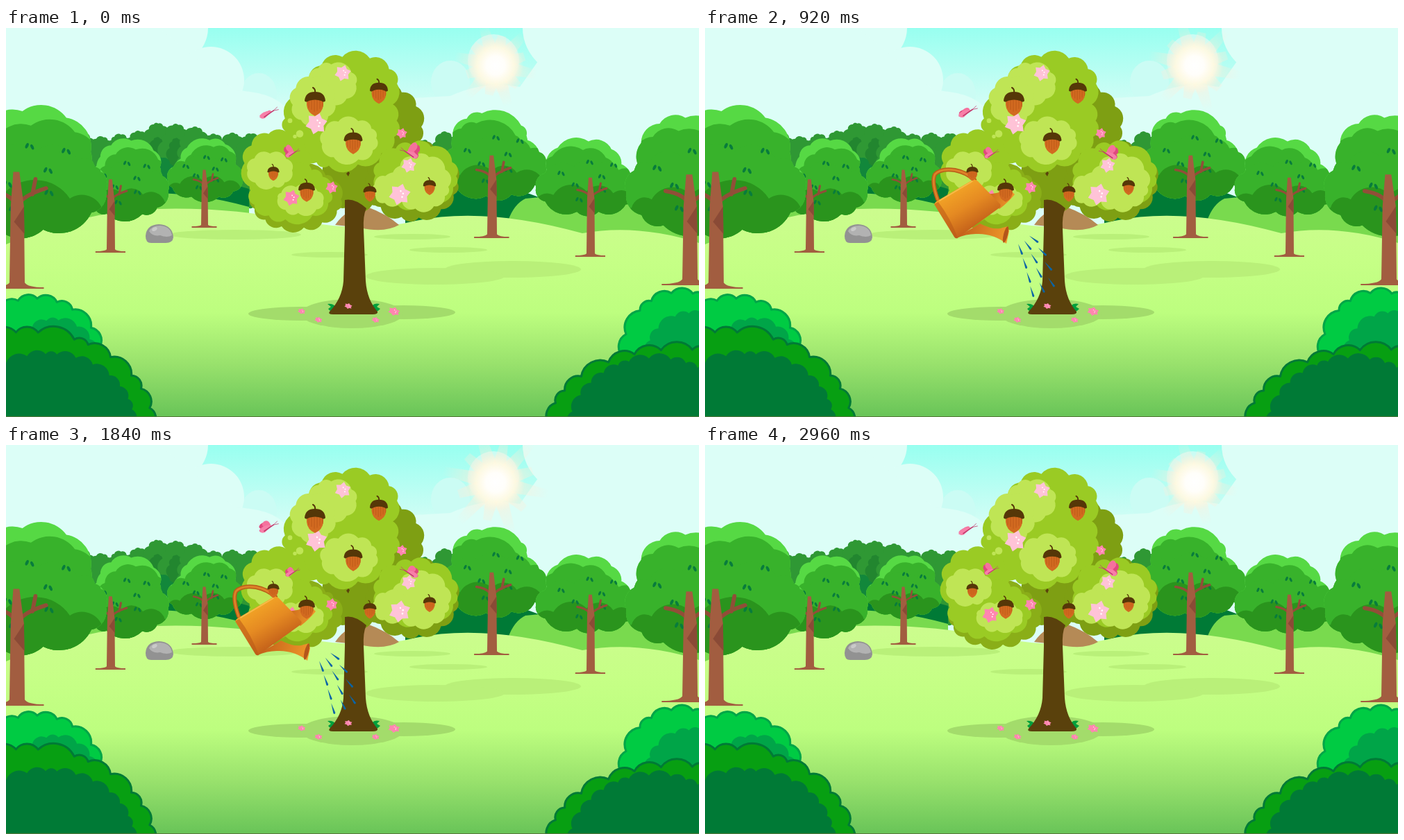
An HTML page with a canvas for the animation above (3000 ms loop, 998x561 px).

```html
<!DOCTYPE html>
<html lang="en">
<head>
<meta charset="utf-8">
<title>Watering the oak</title>
<style>
html, body { margin: 0; width: 998px; height: 561px; overflow: hidden; background: #dcfef6; }
canvas { display: block; }
</style>
</head>
<body>
<canvas id="stage" width="998" height="561"></canvas>
<script>
const W = 998, H = 561, LOOP = 3000, BEAT = 1000, TAU = 2 * Math.PI;
const view = document.getElementById('stage').getContext('2d');
const landCanvas = Object.assign(document.createElement('canvas'), { width: W, height: H });
let c = landCanvas.getContext('2d');

let seed = 7;
const random = () => (seed = seed * 16807 % 2147483647) / 2147483647;
const ramp = (t, a, b) => Math.min(1, Math.max(0, (t - a) / (b - a)));

function fill(color, d) {
  c.fillStyle = color;
  c.fill(d instanceof Path2D ? d : new Path2D(d));
}
function line(color, width, d) {
  c.strokeStyle = color;
  c.lineWidth = width;
  c.lineCap = c.lineJoin = 'round';
  c.stroke(d instanceof Path2D ? d : new Path2D(d));
}
function oval(color, x, y, rx, ry = rx, turn = 0) {
  c.fillStyle = color;
  c.beginPath();
  c.ellipse(x, y, rx, ry, turn, 0, TAU);
  c.fill();
}
function at(x, y, turn, sx, sy, draw) {
  c.save();
  c.translate(x, y);
  c.rotate(turn);
  c.scale(sx, sy);
  draw();
  c.restore();
}
function stops(g, colors) {
  colors.forEach((color, i) => g.addColorStop(i / (colors.length - 1), color));
  return g;
}
const linear = (x0, y0, x1, y1, ...colors) => stops(c.createLinearGradient(x0, y0, x1, y1), colors);
const radial = (r, ...colors) => stops(c.createRadialGradient(0, 0, 0, 0, 0, r), colors);

// Ellipse whose rim is broken into bulging, slightly uneven leaf clumps.
function leafy(x, y, rx, ry, bump, round = 0.62) {
  const n = Math.round(Math.PI * (rx + ry) / bump), inset = bump * 0.13, points = [];
  for (let i = 0; i < n; i++) {
    const a = (i + (random() - 0.5) * 0.55) / n * TAU;
    points.push([x + (rx - inset) * Math.cos(a), y + (ry - inset) * Math.sin(a)]);
  }
  let d = 'M' + points[0];
  points.forEach((p, i) => {
    const q = points[(i + 1) % n], r = Math.hypot(p[0] - q[0], p[1] - q[1]) * round;
    d += `A${r} ${r} 0 0 1 ${q}`;
  });
  return new Path2D(d + 'Z');
}
function join(...paths) {
  const all = new Path2D();
  paths.forEach(p => all.addPath(p));
  return all;
}

/* ---------- sky ---------- */
function sky() {
  const cloud = '#dcfef7', haze = '#cbfcf4';
  c.fillStyle = linear(0, 0, 0, 110, '#98fff0', '#d2fdf5');
  c.fillRect(0, 0, W, H);
  oval(haze, 364, 95, 26, 30);
  oval(haze, 640, 78, 28, 31);
  oval(haze, 702, 47, 37, 38);
  oval(cloud, 220, 0, 71, 60);
  oval(cloud, 295, 75, 48);
  oval(cloud, 830, 0, 86, 75);
  fill(cloud, 'M0 0H220L330 90Q380 92 400 112L640 98Q690 75 740 85L800 0H998V330H0Z');
}
function sun(beat) {
  const reach = 58 + 42 * beat, size = 40 + 5 * beat;
  at(705, 54, 0.22, 1, 1, () => {
    c.fillStyle = radial(reach, 'rgba(255,246,224,.9)', 'rgba(255,238,214,.45)', 'rgba(255,232,215,0)');
    for (let i = 0; i < 12; i++) {
      const len = reach * (i % 2 ? 0.72 : 1);
      c.fill(new Path2D(`M8-11L${len}-6V6L8 11Z`));
      c.rotate(TAU / 12);
    }
    oval(radial(size, '#fff', '#fffefa', 'rgba(255,250,226,.85)', 'rgba(255,242,220,0)'), 0, 0, size);
  });
}

/* ---------- land ---------- */
function forest() {
  for (let x = 110; x < 370; x += 27) {
    const top = 150 - 18 * Math.exp(-(((x - 240) / 50) ** 2)) + 8 * random();
    fill('#2f9834', leafy(x, top + 55, 25, 55, 15));
    if (x > 190 && x < 300) fill('#22862f', leafy(x, top + 65, 14, 45, 12));
  }
  fill('#2f9834', leafy(602, 210, 20, 50, 15));
  fill('#2f9834', leafy(632, 205, 22, 57, 15));
  fill('#12873b', leafy(222, 225, 24, 40, 16));
  fill('#007a36', 'M210 270V225Q260 205 350 232V270ZM575 285V214Q640 195 770 245V285Z');
  fill('#79da4e', 'M0 340V238H180Q270 235 350 258V340ZM715 340Q715 262 748 246L830 238H998V340Z');
}
function field() {
  fill(linear(0, 260, 0, H, '#ccfc8e', '#c6ff86', '#bdfe7f', '#98e16c', '#68c458'),
    'M0 312Q110 264 218 261Q320 258 420 278Q520 296 590 278Q690 257 830 296Q910 282 998 310V561H0Z');
  fill('#b58a56', 'M474 284Q492 258 520 258Q548 268 566 284Q545 296 510 288Z');
  const dim = '#b9f079';
  oval(dim, 330, 298, 95, 7);
  oval(dim, 585, 301, 55, 4);
  oval(dim, 466, 327, 55, 4);
  oval(dim, 637, 320, 56, 4);
  oval(dim, 730, 348, 98, 12);
  oval(dim, 618, 358, 100, 12);
  oval('#a3dc6b', 425, 412, 76, 10);
  oval('#a3dc6b', 572, 410, 75, 10);
  oval('#a3dc6b', 498, 412, 74, 21);
  fill('#929292', 'M201 300Q202 284 220 283Q240 284 241 302Q240 310 230 310H209Q201 310 201 300Z');
  fill('#b2b2b2', 'M206 293Q210 285 222 285Q237 286 239 299Q232 303 222 299Q211 301 206 293Z');
  oval('#c9c9c9', 214, 290, 4, 2.5, -0.5);
}
function trunk(x, top, fork, foot, w) {
  at(x, 0, 0, 1, 1, () => {
    line('#914e38', w * 0.26, `M0 ${fork}Q${-w * 0.3} ${fork - w * 0.8} ${-w * 1.6} ${fork - w}M0 ${fork}Q${w * 0.3} ${fork - w * 0.7} ${w * 1.9} ${fork - w * 1.2}M${w} ${fork - w * 0.8}l${w * 0.2} ${-w}`);
    fill('#a25d40', `M${-w * 0.25} ${top}H${w * 0.15}L${w * 0.45} ${fork}L${w / 2} ${foot - w * 0.4}Q${w * 0.7} ${foot - 2} ${w * 1.75} ${foot - 2}V${foot}H${-w * 1.85}V${foot - 2}Q${-w * 0.7} ${foot - 2} ${-w / 2} ${foot - w * 0.4}L${-w * 0.42} ${fork}Z`);
    fill('#8a4a36', `M${w * 0.45} ${fork}L${-w * 0.2} ${fork + w}L${w * 0.48} ${fork + w * 1.8}Z`);
  });
}
function tree(x, crownX, top, bottom, rx, foot, w) {
  const ry = (bottom - top) / 2, y = top + ry, lean = crownX < W / 2 ? 1 : -1;
  const crown = join(
    leafy(crownX + 0.08 * lean * rx, y - ry * 0.3, rx * 0.74, ry * 0.7, rx * 0.5, 0.7),
    leafy(crownX, y + ry * 0.27, rx, ry * 0.73, rx * 0.5, 0.7));
  fill('#56d944', crown);
  c.save();
  c.clip(crown);
  at(0.1 * rx * lean, ry * 0.22, 0, 1, 1, () => fill('#38b22b', crown));
  fill('#38b22b', leafy(crownX, y + ry * 0.4, rx * 1.1, ry * 0.75, rx * 0.4));
  fill('#2a941d', leafy(crownX, y + ry * 0.8, rx * 1.05, ry * 0.5, rx * 0.4));
  c.restore();
  for (let i = 0; i < 7; i++) {
    const a = i * 2.4, r = 0.25 + 0.06 * i, s = 0.5 + w / 50;
    for (const side of [-1, 1])
      oval('#087c3c', crownX + r * rx * Math.cos(a) + side * 4 * s, y + r * ry * Math.sin(a) + side * s, 2.2 * s, 4.4 * s, -side * 0.45);
  }
  trunk(x, y + ry * 0.02, y + ry * 0.55, foot, w);
}
function bush(body, edge, ...shape) {
  const p = leafy(...shape);
  fill(body, p);
  if (edge) line(edge, 3, p);
}
function bushes() {
  const lime = '#00cb43', moss = '#00a548', leaf = '#079f12', dark = '#007a36';
  bush(lime, moss, 42, 488, 102, 102, 32);
  bush(moss, '', 70, 490, 66, 72, 24);
  bush(leaf, dark, 28, 580, 188, 146, 34);
  bush(dark, '', 60, 575, 128, 108, 24);
  bush(lime, moss, 972, 472, 88, 95, 32);
  bush(moss, '', 990, 480, 72, 72, 24);
  bush(leaf, dark, 970, 580, 194, 121, 34);
  bush(dark, '', 935, 585, 128, 112, 24);
}
function oak() {
  const deep = '#7e9f13', mid = '#9acb24', pale = '#bfe555';
  const clump = (color, ...shape) => fill(color, leafy(...shape));
  clump(deep, 530, 140, 72, 62, 30);
  clump(deep, 505, 218, 52, 46, 30);
  clump(deep, 585, 220, 68, 58, 30);
  clump('#8aae18', 418, 245, 68, 47, 28);
  clump(mid, 500, 86, 68, 50, 34);
  clump(mid, 482, 138, 85, 66, 32);
  clump(mid, 390, 200, 51, 53, 32);
  clump(mid, 410, 238, 62, 42, 28);
  clump(mid, 590, 213, 62, 49, 30);
  clump(pale, 470, 80, 37, 31, 26);
  clump(pale, 442, 105, 33, 37, 26);
  clump(pale, 494, 162, 43, 33, 28);
  clump(pale, 380, 205, 35, 27, 24);
  clump(pale, 424, 248, 36, 22, 24);
  clump(pale, 598, 223, 43, 42, 28);
  clump(pale, 556, 233, 30, 24, 24);
  for (let i = 0; i < 6; i++) oval(pale, 409 + 7 * i, 130 + 40 * random(), 2.5 + 3 * random());
  fill('#009f3c', 'M478 411Q475 396 463 398L468 402L464 405Q467 410 478 411ZM522 411Q526 395 538 398L534 402L539 405Q534 411 522 411Z');
  fill('#5a410c', 'M488 248Q502 245 519 260Q514 270 515 290L518 365Q520 392 535 409Q536 413 528 413H471Q463 413 466 409Q484 390 486 365L488 290ZM490 210l3-3 2 2-2 5Z');
}
function paintLand() {
  forest();
  field();
  tree(286, 287, 158, 249, 58, 288, 10);
  tree(151, 172, 158, 276, 66, 324, 12);
  tree(16, 30, 111, 300, 122, 376, 22);
  tree(700, 703, 117, 248, 80, 303, 14);
  tree(842, 838, 158, 271, 80, 330, 12);
  tree(985, 985, 123, 296, 98, 371, 22);
  bushes();
  oak();
  c.fillStyle = '#57783a';
  c.fillRect(0, 560, W, 1);
}

/* ---------- moving parts ---------- */
function acorn(x, y, s) {
  at(x, y, 0, s, s, () => {
    fill('#d26a20', 'M-12-5V5Q-11 16 0 21Q11 16 12 5V-5Z');
    for (let i = -9; i < 12; i += 4) line('#b85717', 0.8, `M${i}-2V${15 - Math.abs(i) * 0.7}`);
    line('#553708', 2, 'M0-12Q1-18-3-20');
    fill('#553708', 'M-15-1Q-14-14 0-14Q14-14 15-1Q13 2 9-1Q0-4-9-1Q-13 2-15-1Z');
  });
}
function acorns() {
  acorn(445, 106, 1);
  acorn(537, 91, 0.87);
  acorn(500, 163, 0.9);
  acorn(385, 208, 0.58);
  acorn(433, 234, 0.8);
  acorn(524, 237, 0.64);
  acorn(610, 228, 0.62);
}
function blossom(x, y, r, petal, beat, squash = 1) {
  at(x, y, 0.3 - 0.32 * beat, r / 16, squash * r / 16, () => {
    for (let i = 0; i < 6; i++) {
      fill(petal, 'M0 0Q-8-6-5-10L0-16L5-10Q8-6 0 0Z');
      oval('#fff', 0, 5, 1.3);
      c.rotate(TAU / 6);
    }
  });
}
function blossoms(beat) {
  const light = '#ffc3d7', hot = '#ff86b0';
  blossom(447, 138, 16, light, beat);
  blossom(485, 65, 12, light, beat);
  blossom(580, 198, 11, light, beat);
  blossom(567, 240, 16, light, beat);
  blossom(411, 245, 12, hot, beat);
  blossom(469, 230, 9, hot, beat);
  blossom(570, 152, 8, hot, beat);
  for (let i = 0; i < 5; i++) {
    const a = i * TAU / 5 - 0.3;
    blossom(492 + 70 * Math.cos(a), 412 + 11 * Math.sin(a), i ? 6 : 9, hot, beat, 0.7);
  }
}
function butterfly(x, y, side, size, open) {
  at(x, y, 0, size * side, size, () => {
    c.rotate(-0.48);
    c.save();
    c.transform(1, 0, -0.15, 0.12 + 0.88 * open, 0, 0);
    fill('#e0487f', 'M3 1Q-2-21-12-18Q-17-13-13-7Q-18-3-13 3Z');
    fill('#f5719d', 'M3 0Q2-21-6-20Q-13-16-7-6Q-13-4-10 2Z');
    c.restore();
    fill('#f77fa8', 'M5 0Q-4-7-14-3Q-16 3-9 4Z');
    line('#c23a6c', 1.6, 'M-9 2L7 0');
    line('#c23a6c', 0.7, 'M7 0L14-2M7 0L14 2');
  });
}
function can() {
  const bronze = '#c5621a', amber = '#f09a2a', handle = 'M335 247Q326 222 331 211Q340 202 360 205Q376 208 388 219';
  line('#b85c18', 6, handle);
  line('#dd8228', 3, handle);
  fill(linear(400, 238, 445, 250, bronze, amber), 'M400 240Q420 240 438 232L446 240Q436 252 424 261Z');
  fill(linear(370, 285, 440, 300, bronze, amber), 'M362 302L396 282Q414 291 425 289L436 286L438 293L434 311Q416 297 394 297Q378 296 362 303Z');
  fill(linear(360, 230, 392, 285, '#f3a526', '#e58a22', bronze), 'M330 254Q331 251 335 249L384 220Q389 217 393 221L425 254Q427 257 423 260L365 302Q361 305 359 301Z');
  fill('rgba(184,88,22,.55)', 'M330 254L336 251Q354 275 364 303Q360 304 358 300Z');
  line('#f7bd4b', 1.5, 'M338 249L385 221');
  oval('#b4551a', 433, 298, 3, 12, 0.25);
}
// Three streams fan out of the rose; rows narrow as they fall.
function water(fall) {
  const rows = fall < 1 ? 3 : 4;
  for (let row = 0; row < rows; row++)
    for (let j = 0; j < 3; j++) {
      const a = 0.64 + 0.11 * row + j * (0.28 - 0.045 * row), d = 18 + 27 * fall + 21 * row;
      at(438 + d * Math.cos(a), 278 + d * Math.sin(a), a, 1, 1, () => fill('#0a64a6', 'M-9 0L6-1.5Q9 0 6 1.5Z'));
    }
}

function draw(t) {
  const beat = (1 - Math.cos(TAU * (t / BEAT - 0.08))) / 2;
  sky();
  sun(beat);
  c.drawImage(landCanvas, 0, 0);
  blossoms(beat);
  c.globalAlpha = Math.min(ramp(t, 280, 400), 1 - ramp(t, 2320, 2440));
  can();
  c.globalAlpha = 1;
  acorns();
  if (t >= 440 && t < 2080) water(ramp(t, 520, 680));
  butterfly(379, 123 - 10 * beat, 1, 1, beat);
  butterfly(413, 180 + 8 * beat, 1, 0.75, 1 - beat);
  butterfly(580, 180 + 8 * beat, -1, 0.95, 1 - beat);
}

paintLand();
c = view;
const start = performance.now();
function tick() {
  draw((performance.now() - start) % LOOP);
  requestAnimationFrame(tick);
}
tick();
</script>
</body>
</html>
```
